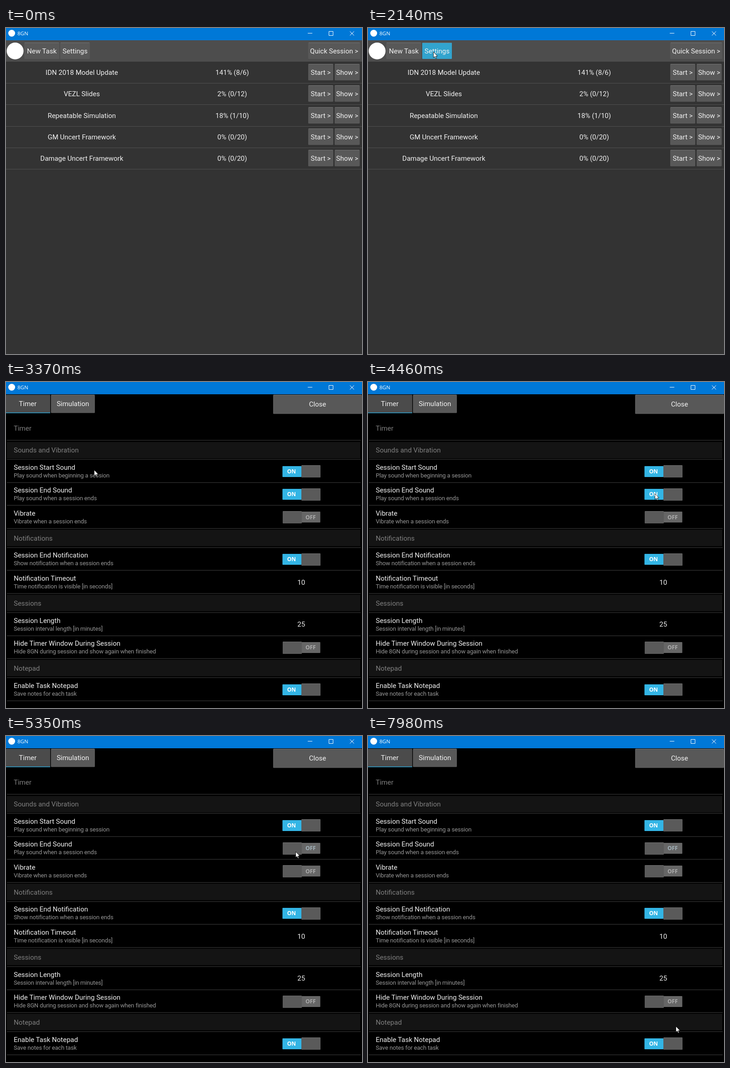
Animation, 781 px wide and 717 px high, one loop 8000 ms. Source, as an HTML page:

```html
<!DOCTYPE html>
<html lang="en">
<head>
<meta charset="utf-8">
<title>Task timer</title>
<style>
  html, body { margin: 0; width: 100%; height: 100%; overflow: hidden; background: #333; }
  svg { display: block; width: 100%; height: 100%; }
  text { font: 15px Roboto, sans-serif; fill: #f2f2f2; white-space: pre; }
  .mid { text-anchor: middle; }
  .caption { font: 11.5px "Open Sans", sans-serif; fill: #fff; }
  .head { fill: #7f7f7f; }
  .desc { font-size: 13px; letter-spacing: -.17px; fill: #969696; }
  .state { font: 700 12px "Open Sans", sans-serif; }
</style>
</head>
<body>
<svg id="stage" viewBox="0 0 781 717" xmlns="http://www.w3.org/2000/svg">
  <g id="tasks"></g>
  <g id="settings"></g>
  <rect width="781" height="27" fill="#0078d7"/>
  <circle cx="12.5" cy="11.5" r="7.5" fill="#fff"/>
  <text class="caption" x="25" y="16">8GN</text>
  <path d="M662 11.5h10M708.5 7.5h9v9h-9zM754.5 7.5l9 9m0-9l-9 9" fill="none" stroke="#fff"/>
  <path id="cursor" d="M.5 .5V13.2L3.4 10.5L5.4 15H7.5L5.6 10H9.5Z" fill="#fff" stroke="#000" stroke-width=".8"/>
</svg>
<script>
const LOOP = 8000;
const byId = id => document.getElementById(id);

function add(parent, tag, attrs, content) {
  const el = document.createElementNS('http://www.w3.org/2000/svg', tag);
  for (const key in attrs) el.setAttribute(key, attrs[key]);
  if (content !== undefined) el.textContent = content;
  parent.append(el);
  return el;
}
const box = (g, x, y, width, height, fill, rx = 0) =>
  add(g, 'rect', { x, y, width, height, fill, rx });
const label = (g, x, y, content, cls = '') =>
  add(g, 'text', { x, y, class: cls }, content);

function button(g, x, y, w, h, content, baseline) {
  box(g, x, y, w, h + 1, 'rgba(88, 88, 88, .2)', 2);
  const face = box(g, x, y, w, h, '#585858', 1.5);
  box(g, x + 1, y, w - 2, 1, '#747474');
  label(g, x + w / 2, baseline, content, 'mid');
  return face;
}

// Task list
const tasks = byId('tasks');
box(tasks, 0, 27, 781, 690, '#333');
box(tasks, 0, 27, 781, 47, '#4d4d4d');
add(tasks, 'circle', { cx: 20, cy: 50.5, r: 18.5, fill: '#fff' });
button(tasks, 40, 32, 77, 36, 'New Task', 56);
const settingsButton = button(tasks, 119, 32, 65, 36, 'Settings', 56);
button(tasks, 663, 32, 114, 36, 'Quick Session >', 56);
[
  ['IDN 2018 Model Update', '141% (8/6)'],
  ['VEZL Slides', '2% (0/12)'],
  ['Repeatable Simulation', '18% (1/10)'],
  ['GM Uncert Framework', '0% (0/20)'],
  ['Damage Uncert Framework', '0% (0/20)']
].forEach(([name, progress], i) => {
  const y = 74 + Math.round(47.3 * i);
  label(tasks, 166.3, y + 29, name, 'mid');
  label(tasks, 496.3, y + 29, progress, 'mid');
  button(tasks, 663, y + 5, 55, 36, 'Start >', y + 29);
  button(tasks, 721, y + 5, 55, 36, 'Show >', y + 29);
  box(tasks, 0, y + 47, 781, 1, '#505050');
});

// Settings
const settings = byId('settings');
box(settings, 0, 27, 781, 690, '#000');
box(settings, 0, 28, 97, 40, '#4b4b4b', 1);
box(settings, 0, 67, 97, 1.5, '#33a8d6');
label(settings, 47.7, 53, 'Timer', 'mid');
button(settings, 98.5, 28, 96.5, 40, 'Simulation', 53);
button(settings, 586, 28, 195, 42, 'Close', 54);
label(settings, 17, 107, 'Timer', 'head');

let rowY = 128;
const below = dy => Math.round(rowY + dy);
const rule = () => box(settings, 2, below(0) - .5, 776, 1.5, '#2c2c2c');

function toggle(g, on, tint = '#adadad') {
  const part = add(g, 'g', {});
  const knobX = on ? 648 : 607;
  const knobY = below(13);
  box(part, on ? 606.5 : 648, below(14.2), 41.5, 24, on ? '#33b5e5' : '#666', 1);
  label(part, on ? 626.3 : 668.3, below(30.4), on ? 'ON' : 'OFF', 'state mid')
    .style.fill = on ? '#fff' : tint;
  box(part, knobX, knobY, 42, 27, '#5a5a5a', 1);
  box(part, knobX + 1, knobY, 40, 1, '#6e6e6e');
  return part;
}

const endSound = {};
rule();
[
  ['Sounds and Vibration',
    ['Session Start Sound', 'Play sound when beginning a session', true],
    ['Session End Sound', 'Play sound when a session ends', true],
    ['Vibrate', 'Vibrate when a session ends', false]],
  ['Notifications',
    ['Session End Notification', 'Show notification when a session ends', true],
    ['Notification Timeout', 'Time notification is visible [in seconds]', '10']],
  ['Sessions',
    ['Session Length', 'Session interval length [in minutes]', '25'],
    ['Hide Timer Window During Session', 'Hide 8GN during session and show again when finished', false]],
  ['Notepad',
    ['Enable Task Notepad', 'Save notes for each task', true]]
].forEach(([section, ...rows]) => {
  box(settings, 2, Math.floor(rowY) + 4, 775, 36, '#141414');
  label(settings, 17, below(27), section, 'head');
  rowY += 42.4;
  rule();
  for (const [name, desc, value] of rows) {
    const isEnd = name === 'Session End Sound';
    if (isEnd) endSound.light = box(settings, 1, below(2), 777, 46, '#2fa7d5');
    label(settings, 17, below(22.4), name);
    const note = label(settings, 17, below(39.4), desc, 'desc');
    if (typeof value === 'string') {
      label(settings, 647.8, below(31.2), value, 'mid');
    } else {
      const control = toggle(settings, value);
      if (isEnd) {
        endSound.note = note;
        endSound.on = control;
        endSound.off = toggle(settings, false, '#a3b3bb');
      }
    }
    rowY += 50.4;
    rule();
  }
});

// Pointer moves: first and last update, number of updates, [time, x, y] stops
const moves = [
  { from: 500, to: 1810, n: 13, stops: [[390, 4, -9], [1270, 82, 49], [1810, 143, 52]] },
  { from: 2690, to: 4460, n: 17,
    stops: [[2580, 143, 52], [3020, 99, 112], [3470, 239, 210], [4360, 617, 243], [4460, 629, 245]] },
  { from: 5240, to: 6130, n: 9, stops: [[5130, 629, 245], [5900, 661, 326], [6130, 627, 394]] },
  { from: 6780, to: 7980, n: 12,
    stops: [[6670, 627, 394], [7080, 616, 465], [7550, 654, 593], [7650, 658, 598], [7760, 658, 598], [7980, 675, 638]] }
];

// Cubic interpolation that never overshoots a stop
function along(stops, t, axis) {
  const last = stops.length - 1;
  if (t >= stops[last][0]) return stops[last][axis];
  const slope = i => (stops[i + 1][axis] - stops[i][axis]) / (stops[i + 1][0] - stops[i][0]);
  const tangent = i => {
    if (i === 0 || i === last) return 0;
    const a = slope(i - 1), b = slope(i);
    return a * b > 0 ? 2 * a * b / (a + b) : 0;
  };
  let i = 0;
  while (t >= stops[i + 1][0]) i++;
  const p = stops[i][axis], q = stops[i + 1][axis];
  const span = stops[i + 1][0] - stops[i][0];
  const u = Math.max(0, (t - stops[i][0]) / span), v = 1 - u;
  return p * v * v * (1 + 2 * u) + q * u * u * (3 - 2 * u)
    + span * u * v * (tangent(i) * v - tangent(i + 1) * u);
}

function pointerAt(t) {
  const move = moves.filter(m => t >= m.from).pop();
  if (!move) return null;
  const step = (move.to - move.from) / (move.n - 1);
  const k = Math.min(move.n - 1, Math.floor((t - move.from) / step + .06));
  const tick = move.from + k * step;
  return [1, 2].map(axis => Math.round(along(move.stops, tick + .01, axis)));
}

const show = (el, on) => el.setAttribute('display', on ? 'inline' : 'none');
const cursor = byId('cursor');

function draw(t) {
  const open = t >= 2260;
  const pressed = t >= 5110 && t < 5240;
  show(tasks, !open);
  show(settings, open);
  settingsButton.setAttribute('fill', t >= 2140 ? '#32a4ce' : '#585858');
  show(endSound.light, pressed);
  endSound.note.style.fill = pressed ? '#6f9aab' : '';
  show(endSound.on, t < 5110);
  show(endSound.off, t >= 5110);
  const tip = pointerAt(t);
  show(cursor, tip);
  if (tip) cursor.setAttribute('transform', `translate(${tip})`);
}

const begin = performance.now();
function frame() {
  draw((performance.now() - begin) % LOOP);
  requestAnimationFrame(frame);
}
frame();
</script>
</body>
</html>
```
